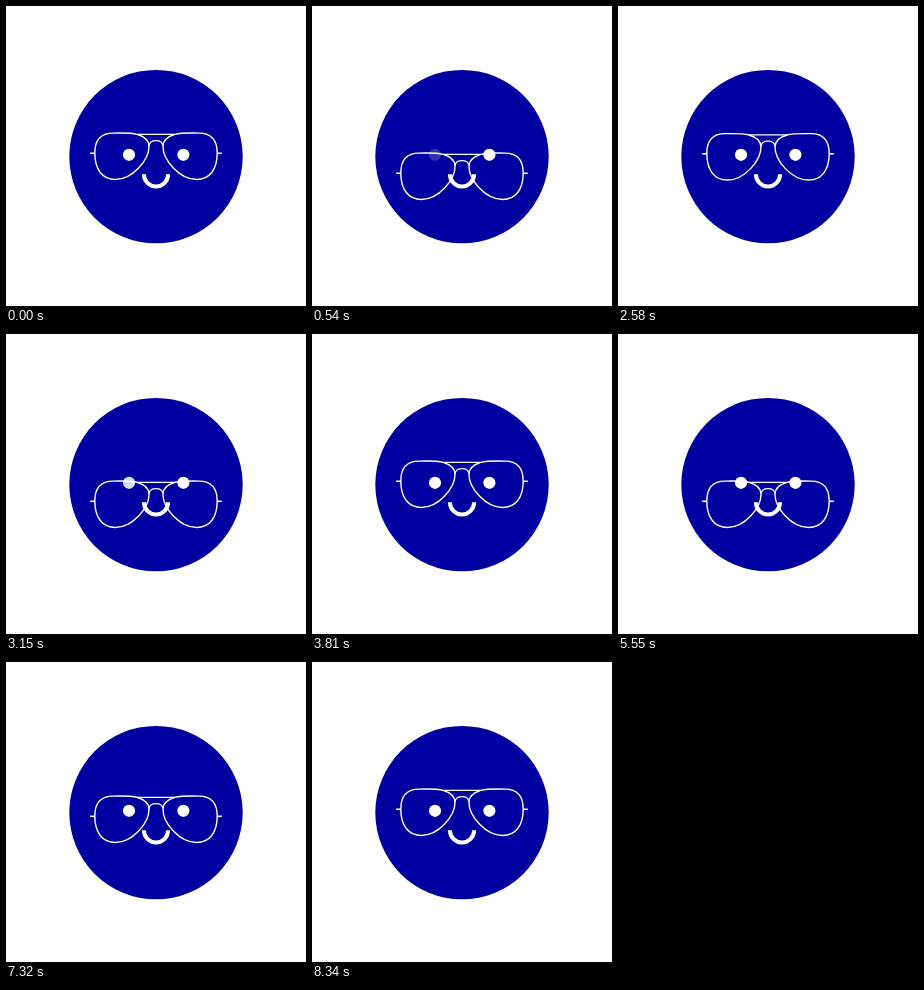
These frames come from a looping animation (300 px wide and 300 px high, 9300 ms). An HTML page:

```html
<!DOCTYPE html>
<html lang="en">
<head>
<meta charset="utf-8">
<title>Winking face</title>
<style>
  html, body { margin: 0; width: 100%; height: 100%; overflow: hidden; background: #fff; }
  svg { display: block; width: 100vw; height: 100vh; }
</style>
</head>
<body>
<svg viewBox="0 0 300 300">
  <defs>
    <g id="half">
      <path d="M88.8 147C88.8 134 95 127.2 107 127.1C116 126.9 126 127 131 128.4C139 130.6 143 134.6 143 140.5C143 154 126.5 173.5 109.5 173.5C96 173.5 88.8 163 88.8 147Z"/>
      <path d="M84.2 147.3H88.8" stroke-width="1.6"/>
    </g>
  </defs>
  <circle cx="150" cy="150.6" r="86.7" fill="#0000a0"/>
  <circle id="eye" cx="123" cy="148.8" r="6.1" fill="#fff"/>
  <circle cx="177.4" cy="148.8" r="6.1" fill="#fff"/>
  <path d="M137.9 168.2A12.1 12.4 0 0 0 162.1 168.2" fill="none" stroke="#fff" stroke-width="4"/>
  <g id="glasses" fill="none" stroke="#fff" stroke-width="1.4">
    <use href="#half"/>
    <use href="#half" transform="translate(300) scale(-1 1)"/>
    <path d="M143 139.6C143.5 135.6 146 134.6 150 134.6S156.5 135.6 157 139.6"/>
    <path d="M131 128.4H169" stroke-width="1.3"/>
  </g>
</svg>
<script>
  const LOOP = 9300, TICK = 30, DROP = 20;

  // Start times and duration of each move, in ms
  const LOWER = { at: [0, 2550, 5235, 7200], ms: 300 };
  const WINK = { at: [450, 3120, 5850, 7650], ms: 250 };
  const RAISE = { at: [870, 3540, 6090, 8070], ms: 270 };

  const glasses = document.getElementById('glasses');
  const eye = document.getElementById('eye');

  const smooth = p => p * p * (3 - 2 * p);
  const hill = p => smooth(1 - Math.abs(2 * p - 1));

  // Sum of one eased curve over all starts of a move
  const sum = ({ at, ms }, curve, t) =>
    at.reduce((s, from) => s + curve(Math.min(1, Math.max(0, (t - from) / ms))), 0);

  function draw(t) {
    const low = sum(LOWER, smooth, t) - sum(RAISE, smooth, t);
    glasses.setAttribute('transform', `translate(0 ${(low * DROP).toFixed(3)})`);
    eye.setAttribute('opacity', (1 - sum(WINK, hill, t)).toFixed(3));
  }

  const start = performance.now();
  function loop() {
    const t = (performance.now() - start) % LOOP;
    draw(Math.floor(t / TICK) * TICK);
    requestAnimationFrame(loop);
  }
  loop();
</script>
</body>
</html>
```
